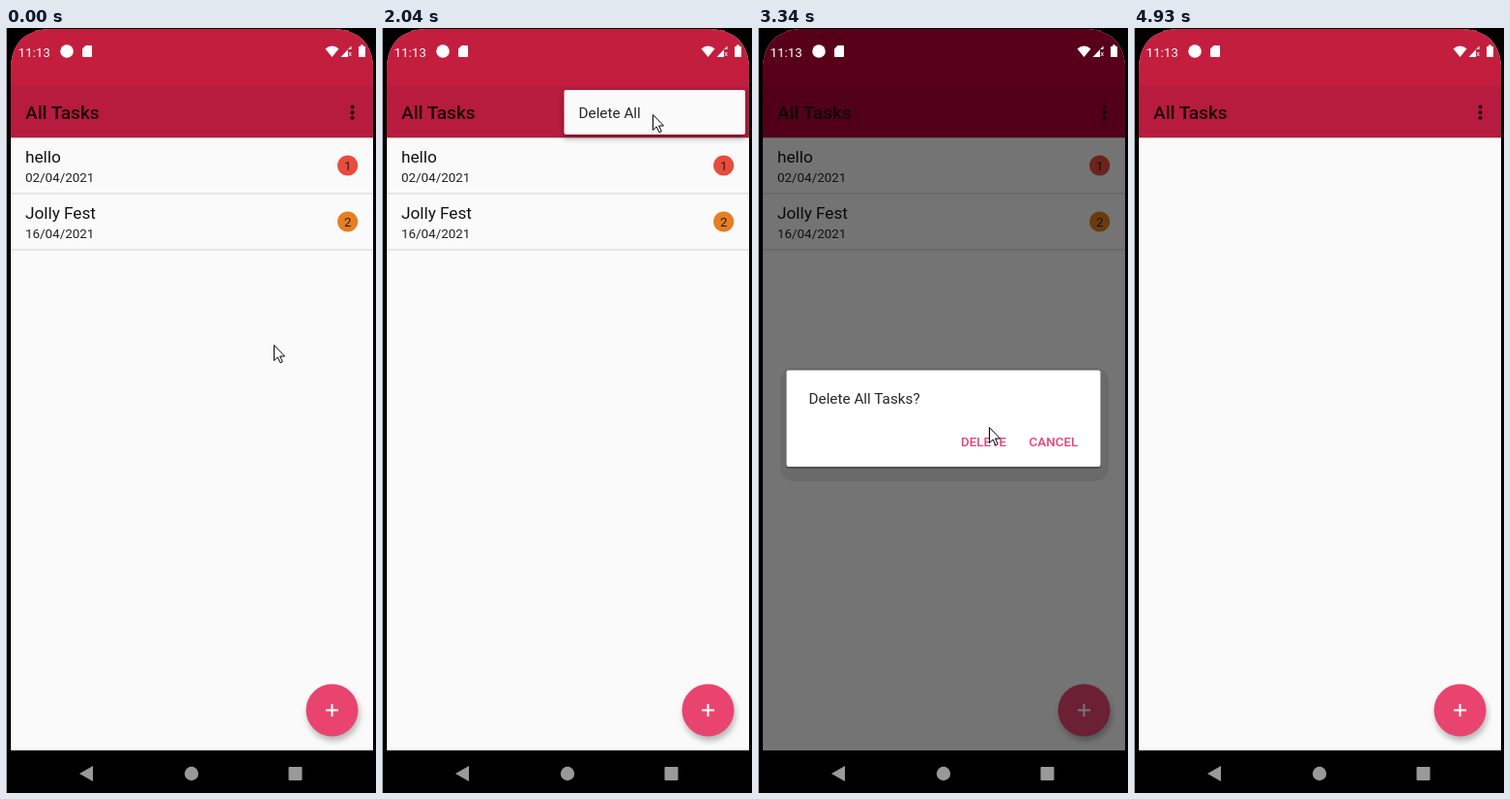
Animation, 383 px wide and 790 px high, one loop 5610 ms. Source, as an HTML page:

```html
<!DOCTYPE html>
<html lang="en">
<head>
<meta charset="utf-8">
<title>All Tasks</title>
<style>
  html, body { margin: 0; width: 100%; height: 100%; overflow: hidden; background: #000; }
  svg { display: block; width: 383px; height: 790px; font-family: Roboto, sans-serif; }
  .title { font-size: 19.1px; font-weight: 500; }
  .task { font-size: 17.2px; }
  .item { font-size: 15.3px; }
  .small { font-size: 13.4px; }
  .button { font-size: 13.4px; font-weight: 500; fill: #e9437a; }
  .middle { text-anchor: middle; }
</style>
</head>
<body>
<svg viewBox="0 0 383 790">
  <defs>
    <filter id="blur" x="-20%" y="-40%" width="140%" height="180%"><feGaussianBlur stdDeviation="3"/></filter>
    <clipPath id="screen"><path d="M5 746V38Q8 4 43 1H342Q377 4 380 38V746Z"/></clipPath>
    <clipPath id="barClip"><path d="M5 60H380V113H5Z"/></clipPath>
  </defs>
  <path d="M.5 0V790" stroke="#999"/>

  <g clip-path="url(#screen)">
    <rect x="5" y="1" width="375" height="745" fill="#fafafa"/>
    <rect x="5" y="111" width="375" height="3" fill="#000" opacity=".22"/>
    <rect id="statusBar" x="5" y="1" width="375" height="60"/>
    <rect id="appBar" x="5" y="60" width="375" height="53"/>
    <text class="title" x="20" y="94" fill="#1c0409">All Tasks</text>
    <g clip-path="url(#barClip)"><circle id="ripple" cx="359.5" cy="86" opacity=".13"/></g>
    <g id="dots" fill="#1c0409">
      <circle cx="358.5" cy="81.5" r="2"/><circle cx="358.5" cy="87.2" r="2"/><circle cx="358.5" cy="92.8" r="2"/>
    </g>
    <g id="tasks"></g>
    <circle cx="339" cy="709" r="27" opacity=".28" filter="url(#blur)"/>
    <circle cx="337.5" cy="704.5" r="27" fill="#e8446f"/>
    <path d="M331 704.5h13M337.5 698v13" stroke="#fff" stroke-width="2"/>
    <rect id="dim" x="5" y="1" width="375" height="745"/>

    <g id="menu">
      <rect id="menuShadow" y="68" height="46" opacity=".3" filter="url(#blur)"/>
      <rect id="menuPanel" y="64" height="46" rx="2"/>
      <text id="menuText" class="item" y="93" fill="#272727">Delete All</text>
    </g>
    <g id="menuDots" fill="#402028">
      <circle cx="358.5" cy="81.5" r="2"/><circle cx="358.5" cy="87.2" r="2"/><circle cx="358.5" cy="92.8" r="2"/>
    </g>

    <g id="dialog">
      <rect id="dialogShadow" x="23" y="351" width="340" height="117" rx="14" opacity=".09"/>
      <rect x="29" y="355" width="326" height="100" rx="3" opacity=".25"/>
      <rect x="29.5" y="353.5" width="325" height="99.5" rx="2" fill="#fff"/>
      <text class="item" x="52.5" y="387.5" fill="#272727">Delete All Tasks?</text>
      <text class="button" x="210" y="431.5">DELETE</text>
      <text class="button" x="280.5" y="431.5">CANCEL</text>
    </g>
  </g>

  <g fill="#fff">
    <text class="small" x="12.5" y="29.5">11:13</text>
    <circle cx="63" cy="24" r="6.8"/>
    <path d="M82.5 18H88q1 0 1 1V29q0 1-1 1H80q-1 0-1-1V21.5Z"/>
    <path d="M330.500 21.500Q337.500 15.500 344.500 21.500L337.500 30Z"/>
    <path d="M346.500 30L357.500 18.500V22H354V30Z"/>
    <path d="M355 25l2.500 4M357.500 25l-2.500 4" stroke="#fff" stroke-width=".8"/>
    <path d="M367 17.500h3V19h2V30H365V19h2Z"/>
  </g>
  <g fill="#999">
    <path d="M76 770L90 762V778Z"/>
    <circle cx="192" cy="770" r="7.200"/>
    <rect x="292.500" y="763" width="14" height="14" rx="1"/>
  </g>
  <path id="cursor" d="M.5 .5V16.500L4.200 13L7 18.800L9.300 17.700L6.600 12H11.500Z" fill="#fff" stroke="#000" stroke-linejoin="round"/>
</svg>

<script>
const LOOP = 5610;
const MENU_RIGHT = 376;
const $ = id => document.getElementById(id);
const set = (id, attrs) => {
  for (const name in attrs) $(id).setAttribute(name, attrs[name]);
};
const show = (id, visible) => set(id, { visibility: visible ? "visible" : "hidden" });

const taskRow = (name, date, badge, color, top) => `
  <text class="task" x="20" y="${top + 26}" fill="#111">${name}</text>
  <text class="small" x="20" y="${top + 46}" fill="#222">${date}</text>
  <circle cx="353.7" cy="${top + 29}" r="10.6" fill="${color}"/>
  <text class="small middle" x="353.7" y="${top + 34}" fill="#222">${badge}</text>
  <path d="M5 ${top + 58}H380" stroke="#dedede" stroke-width="1.6"/>`;
$("tasks").innerHTML =
  taskRow("hello", "02/04/2021", 1, "#e84c3d", 113) +
  taskRow("Jolly Fest", "16/04/2021", 2, "#e67e22", 171);

// Each step overrides only what changes at its time.
const steps = [
  [0, { cursor: [277, 327], ripple: 0, menuX: 0, menuFill: "#fafafa", menuAlpha: 1, dim: 0, dialog: 0, tasks: true }],
  [250, { cursor: [285, 244] }],
  [400, { cursor: [315, 187] }],
  [560, { cursor: [338, 111] }],
  [700, { cursor: [343, 104] }],
  [860, { cursor: [362, 84] }],
  [1320, { ripple: 16 }],
  [1470, { ripple: 18.5 }],
  [1620, { ripple: 0, menuX: 190 }],
  [1740, { menuX: 188.5, cursor: [358, 89] }],
  [1890, { cursor: [289, 93] }],
  [2040, { cursor: [280, 89] }],
  [2440, { menuFill: "#dedcdc" }],
  [2560, { menuFill: "#c9c6c7", dim: 0.07, dialog: 0.32 }],
  [2680, { menuAlpha: 0.42, dim: 0.535, dialog: 1 }],
  [2800, { menuX: 0 }],
  [3070, { cursor: [268, 235] }],
  [3190, { cursor: [243, 370] }],
  [3340, { cursor: [239, 412] }],
  [3460, { cursor: [235, 424] }],
  [3980, { dialog: 0.7 }],
  [4130, { dim: 0, dialog: 0, tasks: false }],
  [4810, { cursor: [285, 639] }],
  [4930, { cursor: null }],
];

function stateAt(time) {
  return Object.assign({}, ...steps.filter(([start]) => start <= time).map(([, change]) => change));
}

function draw(now) {
  const s = stateAt(now % LOOP);
  const dark = s.dim > 0.5;
  set("statusBar", { fill: dark ? "#be0038" : "#c41e3e" });
  set("appBar", { fill: dark ? "#b00036" : "#b71b3e" });
  set("ripple", { r: s.ripple });
  set("dim", { opacity: s.dim });
  show("tasks", s.tasks);

  show("menu", s.menuX);
  show("dots", !s.menuX);
  show("menuDots", s.menuX && s.menuAlpha < 1);
  const width = MENU_RIGHT - s.menuX;
  set("menu", { opacity: s.menuAlpha });
  set("menuShadow", { x: s.menuX, width });
  set("menuPanel", { x: s.menuX, width, fill: s.menuFill });
  set("menuText", { x: s.menuX + 15 });

  set("dialog", { opacity: s.dialog });
  show("dialogShadow", dark);

  show("cursor", s.cursor);
  if (s.cursor) set("cursor", { transform: `translate(${s.cursor})` });
  requestAnimationFrame(draw);
}
requestAnimationFrame(draw);
</script>
</body>
</html>
```
